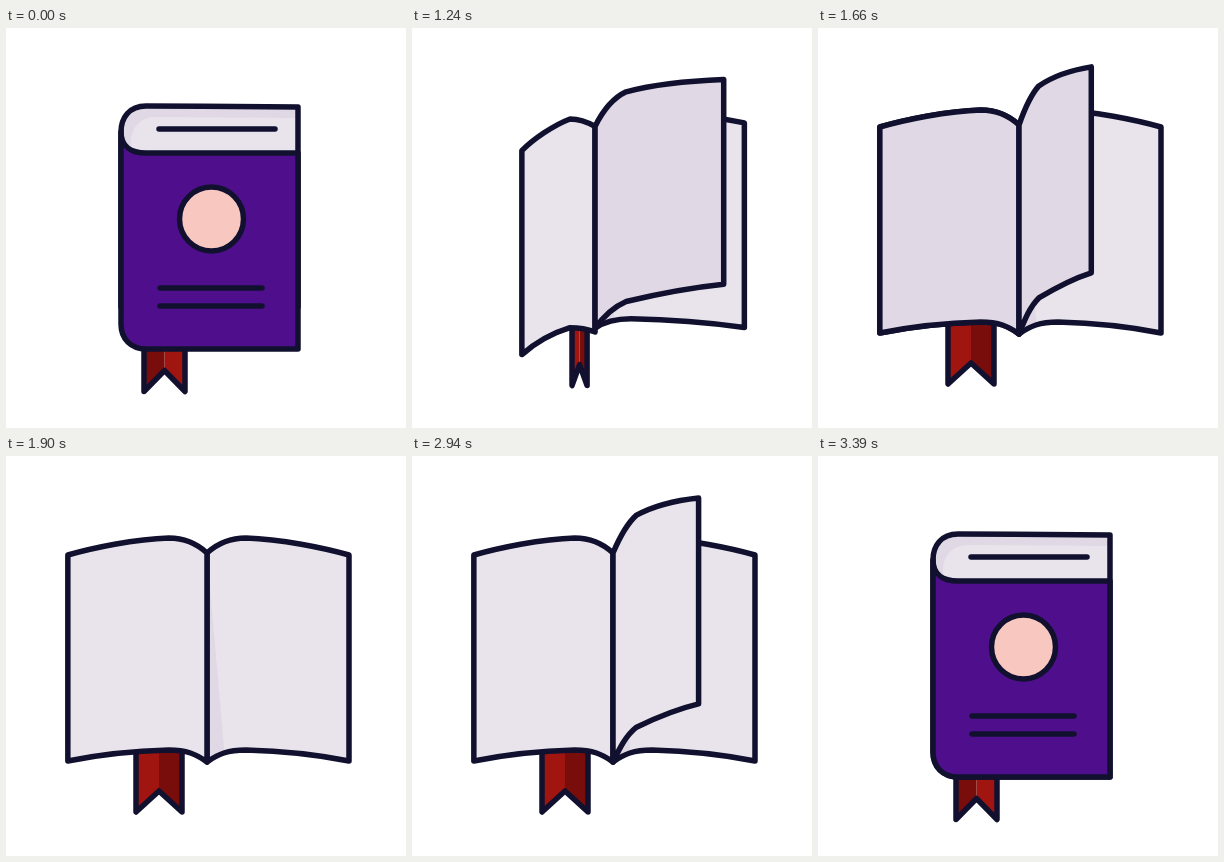
Recreate the animation shown at these times as an HTML page with a canvas. Size 400 px wide and 400 px high, loop 3.42 s.

```html
<!DOCTYPE html>
<html lang="en">
<head>
<meta charset="utf-8">
<title>Book</title>
<style>
  html, body { margin: 0; width: 100%; height: 100%; overflow: hidden; background: #fff; }
  canvas { display: block; width: 400px; height: 400px; }
</style>
</head>
<body>
<canvas id="stage" width="400" height="400"></canvas>
<script>
const ctx = document.getElementById('stage').getContext('2d');
const LOOP = 3420, FLIP = 390;
const INK = '#11112f', PAPER = '#e9e4ec', SHADE = '#e0d8e4', COVER = '#4f0f8c', SKIN = '#f8c8c0';

// Edges run from the spine outwards: two cubic curves, seven points.
const openTop = [[201, 97], [212, 87], [224, 82], [240, 82], [275, 83], [318, 92], [343, 99]];
const openBottom = [[201, 306], [212, 298], [222, 294], [240, 294], [280, 295], [318, 300], [343, 305]];
const pageTop = [[115, 104], [115, 90], [123, 78], [140, 78], [190, 78], [250, 79], [292, 79]];
const coverTop = [[115, 104], [115, 118], [125, 125], [140, 125], [190, 125], [250, 125], [292, 125]];
const coverBottom = [[115, 296], [115, 311], [125, 321], [140, 321], [190, 321], [250, 321], [292, 321]];
const shortBottom = coverBottom.map(([x, y]) => [x, Math.min(y, 279)]);
const sagWeights = [0, 0, 0, 0, 0.3, 0.7, 1];
const liftWeights = [0, 0.1, 0.25, 0.4, 0.62, 0.85, 1];

const mirror = pts => pts.map(([x, y]) => [201 - (x - 201) * 0.98, y]);
const leftTop = mirror(openTop), leftBottom = mirror(openBottom);

const lerp = (a, b, k) => a + (b - a) * k;
const morph = (a, b, k) => a.map((p, i) => [lerp(p[0], b[i][0], k), lerp(p[1], b[i][1], k)]);
const shiftY = (pts, weights, d) => pts.map(([x, y], i) => [x, y + weights[i] * d]);
const smooth = (t, start, length) => {
  const u = Math.min(1, Math.max(0, (t - start) / length));
  return u * u * (3 - 2 * u);
};

function curve(p) {
  ctx.bezierCurveTo(...p[1], ...p[2], ...p[3]);
  ctx.bezierCurveTo(...p[4], ...p[5], ...p[6]);
}

function trace(top, bottom) {
  const back = [...bottom].reverse();
  ctx.beginPath();
  ctx.moveTo(...top[0]);
  curve(top);
  ctx.lineTo(...back[0]);
  curve(back);
  ctx.closePath();
}

function sheet(top, bottom, fill) {
  trace(top, bottom);
  ctx.fillStyle = fill;
  ctx.fill();
  ctx.stroke();
}

function polygon(points) {
  ctx.beginPath();
  points.forEach(p => ctx.lineTo(...p));
  ctx.closePath();
}

function ribbon(closed) {
  const half = lerp(23, -20.5, Math.pow(closed, 0.66));
  const x = 153 + 5.5 * closed + 22 * Math.sin(Math.PI * closed);
  const top = lerp(285, 315, closed), end = lerp(356, 363.5, closed);
  const side = s => [[x, top], [x + s, top], [x + s, end], [x, end - 21]];
  polygon(side(-half));
  ctx.fillStyle = '#a01510';
  ctx.fill();
  polygon(side(half));
  ctx.fillStyle = '#780d0b';
  ctx.fill();
  polygon([[x - half, top], [x + half, top], [x + half, end], [x, end - 21], [x - half, end]]);
  ctx.stroke();
}

function rightSide(top, bottom, closed) {
  trace(top, bottom);
  ctx.save();
  ctx.clip();
  ctx.fillStyle = SHADE;
  ctx.fill();
  ctx.translate(10 * closed, 11 * closed);
  trace(top, bottom.map(([x, y]) => [x + 20, y + 20]));
  ctx.fillStyle = PAPER;
  ctx.fill();
  ctx.restore();
  trace(top, bottom);
  ctx.stroke();
}

function bandLine(spine, f) {
  const x = spine + 38, w = 116 * f * f, d = 150 * (1 - f) * f;
  ctx.beginPath();
  ctx.moveTo(x, 101);
  ctx.quadraticCurveTo(x + w * 0.35, 101 + d * 0.75, x + w, 101 + d);
  ctx.stroke();
}

function coverArt(spine, f) {
  ctx.save();
  ctx.transform(Math.pow(f, 4), 1.5 * (1 - f), 0, 1, spine + 39 * f, -25 * (1 - f));
  ctx.beginPath();
  ctx.arc(51.5, 191, 32, 0, 7);
  ctx.fillStyle = SKIN;
  ctx.fill();
  for (const y of [260, 278]) {
    ctx.moveTo(0, y);
    ctx.lineTo(102, y);
  }
  ctx.restore();
  ctx.stroke();
}

// r is 1 when the leaf lies on the right, -1 on the left.
function leaf(top, bottom, r, opening) {
  const w = (r + 1) / 2, spine = top[0][0];
  const [size, power] = opening ? [134, 0.85] : [139, 1.1];
  const lift = size * Math.pow(w, power) * Math.pow(1 - w, 0.4);
  const scale = r < 0 ? r * 0.98 : r;
  const turn = pts => shiftY(pts, liftWeights, -lift).map(([x, y]) => [spine + (x - spine) * scale, y]);
  sheet(turn(top), turn(bottom), opening ? SHADE : PAPER);
}

function leaves(t, opening) {
  const starts = opening ? [1138, 1282, 1510] : [2490, 2690];
  return starts
    .filter(s => t > s && t < s + FLIP)
    .map(s => Math.cos(Math.PI * smooth(t, s, FLIP)) * (opening ? 1 : -1))
    .sort((a, b) => Math.abs(b) - Math.abs(a));
}

function draw(time) {
  const opening = time < 2200, offset = opening ? 10 : 0;
  const t = Math.floor((time - offset) / 30) * 30 + offset;
  const closed = opening ? 1 - smooth(t, 1000, 340) : smooth(t, 3010, 380);
  const sag = (opening ? 30 : 10) * Math.sin(Math.PI * closed);

  const top = morph(openTop, pageTop, closed);
  const bottom = morph(openBottom, opening ? shortBottom : coverBottom, closed);
  const flapTop = shiftY(morph(leftTop, coverTop, closed), sagWeights, sag);
  const flapBottom = shiftY(morph(leftBottom, coverBottom, closed), sagWeights, sag);
  const spine = top[0][0];
  const front = (flapTop[6][0] - spine) / 177;

  ctx.fillStyle = '#fff';
  ctx.fillRect(0, 0, 400, 400);
  ctx.strokeStyle = INK;
  ctx.lineWidth = 5.5;
  ctx.lineCap = ctx.lineJoin = 'round';

  ribbon(closed);
  rightSide(top, bottom, closed);
  if (front <= 0) sheet(flapTop, flapBottom, PAPER);
  for (const r of leaves(t, opening)) leaf(top, bottom, r, opening);
  if (front > 0) {
    bandLine(spine, front);
    sheet(flapTop, flapBottom, COVER);
    coverArt(spine, front);
  }
}

const begin = performance.now();
function tick() {
  draw((performance.now() - begin) % LOOP);
  requestAnimationFrame(tick);
}
tick();
</script>
</body>
</html>
```
